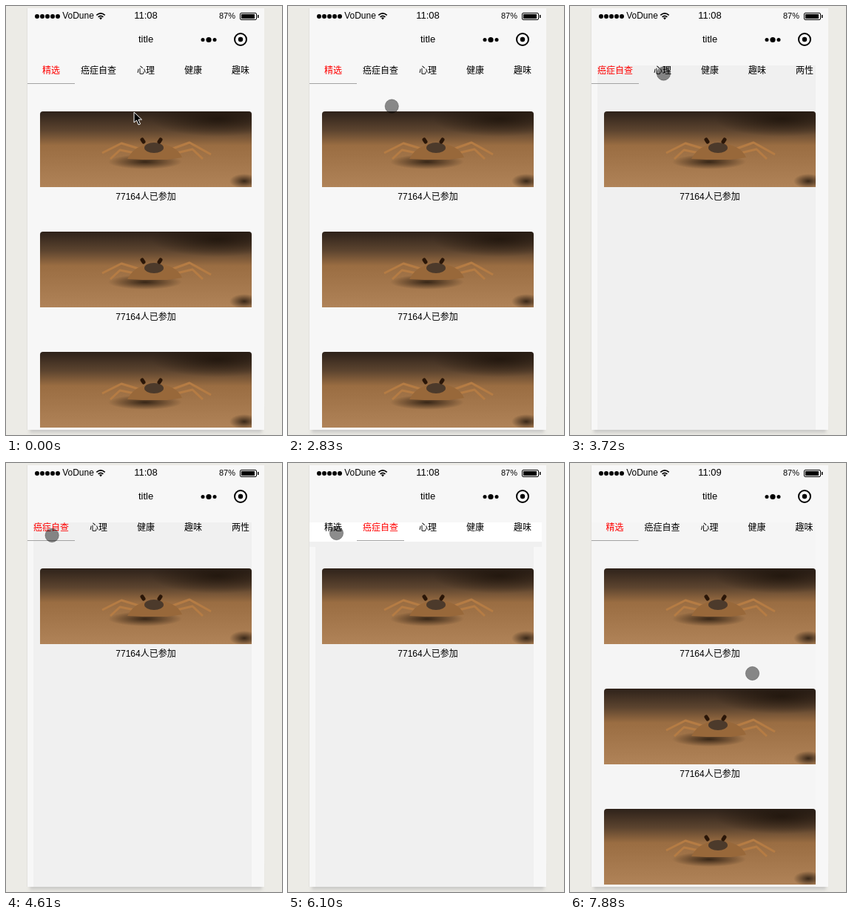
Write an HTML page that moves like this. It is 373 by 578 pixels and loops after 8000 ms.

```html
<!DOCTYPE html>
<html lang="zh-CN">
<head>
<meta charset="utf-8">
<title>Tabs</title>
<style>
html, body { margin: 0; width: 100%; height: 100%; overflow: hidden; background: #ecebe6; }
svg { display: block; }
text { font: 12px "Liberation Sans", "Noto Sans CJK SC", "Noto Sans CJK", sans-serif; text-anchor: middle; }
</style>
</head>
<body>
<svg width="373" height="578" viewBox="0 0 373 578">
  <defs>
    <clipPath id="screen"><rect x="29" y="3" width="320" height="568"/></clipPath>
    <clipPath id="frame"><path d="M0 102V4Q0 0 4 0H282Q286 0 286 4V102Z"/></clipPath>
    <linearGradient id="sand" x2="0" y2="1">
      <stop offset="0" stop-color="#2e221a"/>
      <stop offset=".25" stop-color="#5c442f"/>
      <stop offset=".45" stop-color="#9a6d42"/>
      <stop offset="1" stop-color="#b08358"/>
    </linearGradient>
    <radialGradient id="dark">
      <stop offset="0" stop-color="#1c120a" stop-opacity=".8"/>
      <stop offset="1" stop-color="#1c120a" stop-opacity="0"/>
    </radialGradient>
    <filter id="soft"><feGaussianBlur stdDeviation="2"/></filter>
    <g id="card">
      <g clip-path="url(#frame)">
        <rect width="286" height="102" fill="url(#sand)"/>
        <ellipse cx="240" cy="10" rx="90" ry="24" fill="url(#dark)"/>
        <ellipse cx="276" cy="94" rx="20" ry="10" fill="url(#dark)"/>
        <ellipse cx="142" cy="68" rx="50" ry="10" fill="url(#dark)"/>
        <path d="M140 52L110 43L84 56M138 58L108 52L95 64M174 52L202 42L231 58M176 58L206 51L220 64"
          fill="none" stroke="#b57c44" stroke-width="3" stroke-linejoin="round"/>
        <path d="M118 64Q128 44 155 43Q184 44 192 62L172 65H138Z" fill="#98683a"/>
        <ellipse cx="154" cy="49" rx="13" ry="7" fill="#4c3a2b"/>
        <path d="M138 38l2 3M163 38l-2 3" stroke="#2a1608" stroke-width="5" stroke-linecap="round"/>
      </g>
      <text x="143" y="119">77164人已参加</text>
    </g>
  </defs>

  <rect x="32" y="540" width="314" height="35" fill="#aaa" opacity=".5" filter="url(#soft)"/>
  <rect x="28" y="3" width="1" height="568" fill="#e2e1dd"/>
  <rect x="29" y="3" width="320" height="568" fill="#f7f7f7"/>

  <g clip-path="url(#screen)">
    <rect id="panel" y="80" height="491"/>
    <g id="strip">
      <rect x="29" y="106" width="314" height="7" fill="#f0f0f0"/>
      <rect x="29" y="80" width="314" height="26" fill="#fff"/>
    </g>
    <g id="tabs"></g>
    <use href="#card" x="46" y="142"/>
    <g id="more">
      <use href="#card" x="46" y="304"/>
      <use href="#card" x="46" y="466"/>
    </g>
  </g>

  <g id="signal"></g>
  <text x="97.5" y="17">VoDune</text>
  <path d="M122.3 12.4Q128 7.4 133.7 12.4M124.6 14.8Q128 11.8 131.4 14.8" fill="none" stroke="#000" stroke-width="1.7"/>
  <path d="M126 16L128 18.5L130 16Q128 14.7 126 16Z"/>
  <text id="clock" x="189" y="17" style="font-size:13px"></text>
  <text x="299" y="17" style="font-size:11px">87%</text>
  <rect x="316.5" y="9.5" width="22" height="9" rx="1.5" fill="none" stroke="#000"/>
  <path d="M318 11h18v6h-18zM340 12h1.500v4h-1.500z"/>

  <text x="189" y="49" style="font-size:13px">title</text>
  <circle cx="266" cy="45.5" r="2.5"/>
  <circle cx="274" cy="45.5" r="3.6"/>
  <circle cx="282" cy="45.5" r="2.5"/>
  <circle cx="317" cy="45" r="8" fill="none" stroke="#000" stroke-width="2"/>
  <circle cx="317" cy="45" r="3.2"/>

  <g id="pointer">
    <path id="arrow" d="M0 0V14L3.5 11L6 17L8.500 16L6 10H10.500Z" stroke="#fff"/>
    <path id="beam" d="M-3 -7Q0 -7 0 -5V5Q0 7 -3 7M3 -7Q0 -7 0 -5M0 5Q0 7 3 7M-2 2H2" fill="none" stroke="#000"/>
    <circle id="touch" r="9.2" fill-opacity=".45" stroke="#000" stroke-opacity=".25"/>
  </g>
</svg>
<script>
const $ = id => document.getElementById(id);
const show = (id, on) => $(id).setAttribute('display', on ? 'inline' : 'none');
const range = n => [...Array(n).keys()];

// The screen refreshes in steps; all moments below count them
const LOOP = 8000, STEP = 148.7;
const BEAM = 8, TOUCH = 19, SWITCH = 25, DRAG = 34, DROP = 36, RETURN = 44, MINUTE = 53;
const TAB = 64, GRAB = 57;

// Pointer moves: from step, to step, end point
const moves = [
  [0, 4, 120, 87], [7, 8, 121.5, 88], [18, 20, 159, 182], [20, 23, 126.5, 91],
  [26, 32, GRAB, 98], [33, DROP, 155, 103.5], [DROP, 41, 65.5, 94.5],
  [45, 47, 129, 96], [49, MINUTE, 246.5, 283.5]
];

function pointerAt(step) {
  let x = 173, y = 143;
  for (const [from, to, endX, endY] of moves) {
    const k = Math.min(1, Math.max(0, (step - from) / (to - from)));
    const ease = k * k * (3 - 2 * k);
    x += (endX - x) * ease;
    y += (endY - y) * ease;
  }
  return [x, y];
}

function scrollAt(step, x) {
  if (step >= RETURN) return 0.5;
  if (step < SWITCH || step >= DROP) return 0;
  return step < DRAG ? TAB : Math.max(0, TAB - (x - GRAB));
}

$('signal').innerHTML = range(5)
  .map(i => `<circle cx="${42 + 7 * i}" cy="14" r="3"/>`).join('');
$('tabs').innerHTML = ['精选', '癌症自查', '心理', '健康', '趣味', '两性']
  .map((name, i) => `<text x="${61 + TAB * i}" y="91">${name}</text>`).join('') +
  `<rect id="line" y="104" width="${TAB}" height="1" fill="#a3a3a3"/>`;
const labels = $('tabs').querySelectorAll('text');

function draw(now) {
  const step = Math.floor((now % LOOP + 10) / STEP);
  const [x, y] = pointerAt(step);
  const second = step >= SWITCH && step < RETURN;

  $('tabs').setAttribute('transform', `translate(${-scrollAt(step, x)} 0)`);
  labels.forEach((label, i) => label.setAttribute('fill', i === +second ? '#f00' : '#000'));
  $('line').setAttribute('x', second ? 29 + TAB : 29);

  const left = second ? 37 : 29;
  $('panel').setAttribute('x', left);
  $('panel').setAttribute('width', 332 - left);
  $('panel').setAttribute('fill', second ? '#f0f0f0' : '#f5f5f5');
  show('panel', step >= SWITCH);
  show('strip', second && step >= DRAG);
  show('more', !second);

  $('clock').textContent = step < MINUTE ? '11:08' : '11:09';
  $('pointer').setAttribute('transform', `translate(${x} ${y})`);
  show('arrow', step < BEAM);
  show('beam', step >= BEAM && step < TOUCH);
  show('touch', step >= TOUCH);
}

const start = performance.now();
function tick() {
  draw(performance.now() - start);
  requestAnimationFrame(tick);
}
tick();
</script>
</body>
</html>
```
